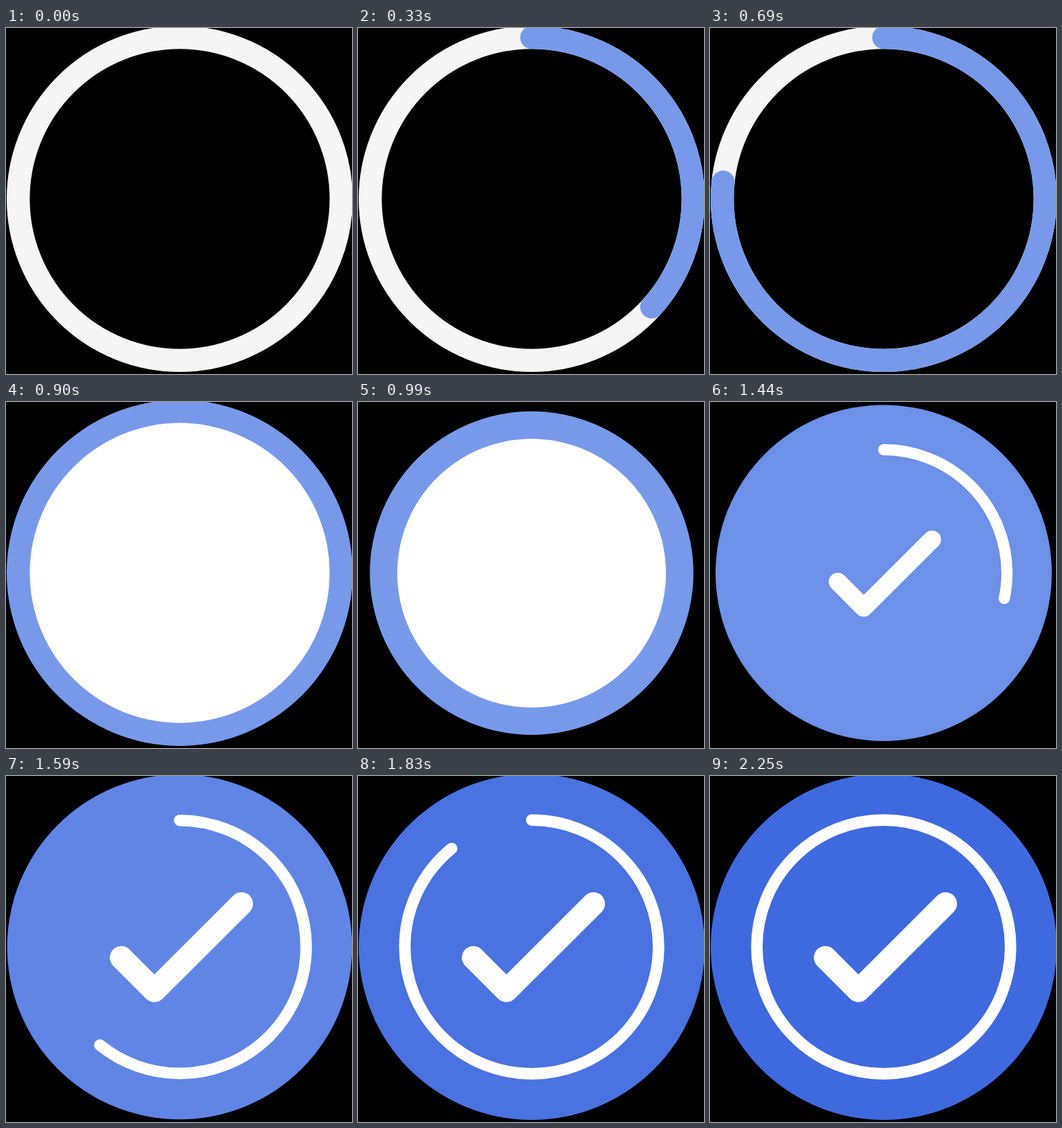
Animation of 500 by 500 pixels, one loop 2730 ms. Source, as an HTML page with a canvas:

```html
<!DOCTYPE html>
<html lang="en">
<head>
<meta charset="utf-8">
<title>Progress ring to check mark</title>
<style>
  html, body { margin: 0; height: 100%; overflow: hidden; background: #000; }
  canvas { display: block; }
</style>
</head>
<body>
<canvas id="stage" width="500" height="500"></canvas>
<script>
const ctx = document.getElementById('stage').getContext('2d');
const LOOP = 2730, STEP = 30, TAU = Math.PI * 2;
const LIGHT = [120, 153, 234], DEEP = [63, 105, 222];

const progress = (t, from, to) => Math.min(1, Math.max(0, (t - from) / (to - from)));
const mix = (a, b, k) => a + (b - a) * k;
const smooth = u => u * u * (3 - 2 * u);
const ease = (t, from, to) => smooth(progress(t, from, to));

// cubic-bezier(x1, 0, x2, 1)
function bezier(u, x1, x2) {
  let lo = 0, hi = 1;
  for (let i = 0; i < 30; i++) {
    const s = (lo + hi) / 2, r = 1 - s;
    const x = 3 * x1 * s * r * r + 3 * x2 * s * s * r + s * s * s;
    if (x < u) lo = s; else hi = s;
  }
  return u >= 1 ? 1 : smooth(lo);
}

// Draws in coordinates scaled about the middle of the stage
function scaled(scale, draw) {
  if (scale <= 0) return;
  ctx.save();
  ctx.translate(250, 250);
  ctx.scale(scale, scale);
  draw();
  ctx.restore();
}

function disc(radius, color) {
  ctx.beginPath();
  ctx.arc(1, -3, radius, 0, TAU);
  ctx.fillStyle = color;
  ctx.fill();
}

function ring(radius, width, color, part) {
  if (part <= 0) return;
  ctx.beginPath();
  ctx.arc(1, -3, radius, -TAU / 4, -TAU / 4 + TAU * part);
  ctx.lineWidth = width;
  ctx.strokeStyle = color;
  ctx.stroke();
}

function check() {
  ctx.beginPath();
  ctx.moveTo(-83.3, 12.4);
  ctx.lineTo(-35.6, 60.2);
  ctx.lineTo(90.3, -65.4);
  ctx.lineWidth = 33.3;
  ctx.strokeStyle = '#fff';
  ctx.stroke();
}

function render(t) {
  ctx.fillStyle = '#000';
  ctx.fillRect(0, 0, 500, 500);
  ctx.lineCap = ctx.lineJoin = 'round';

  const tint = ease(t, 1200, 2070);
  const blue = `rgb(${LIGHT.map((c, i) => Math.round(mix(c, DEEP[i], tint)))})`;

  if (t < 900) {
    scaled(1, () => {
      ring(233.33, 33.33, '#f5f5f5', 1);
      ring(233.33, 33.33, blue, t / 900);
    });
    return;
  }

  const bounce = 1 - 0.1 * (ease(t, 900, 1050) - ease(t, 1050, 1650));
  scaled(bounce, () => disc(250, blue));
  scaled(1 - ease(t, 900, 1350), () => disc(216.67, '#fff'));
  scaled(ease(t, 1125, 1575), check);
  scaled(bounce, () => ring(183.33, 16.67, '#fff', bezier(progress(t, 1050, 2250), 0.5, 0.25)));
}

function tick() {
  const t = performance.now() % LOOP;
  render(Math.floor(t / STEP) * STEP);
  requestAnimationFrame(tick);
}
tick();
</script>
</body>
</html>
```
